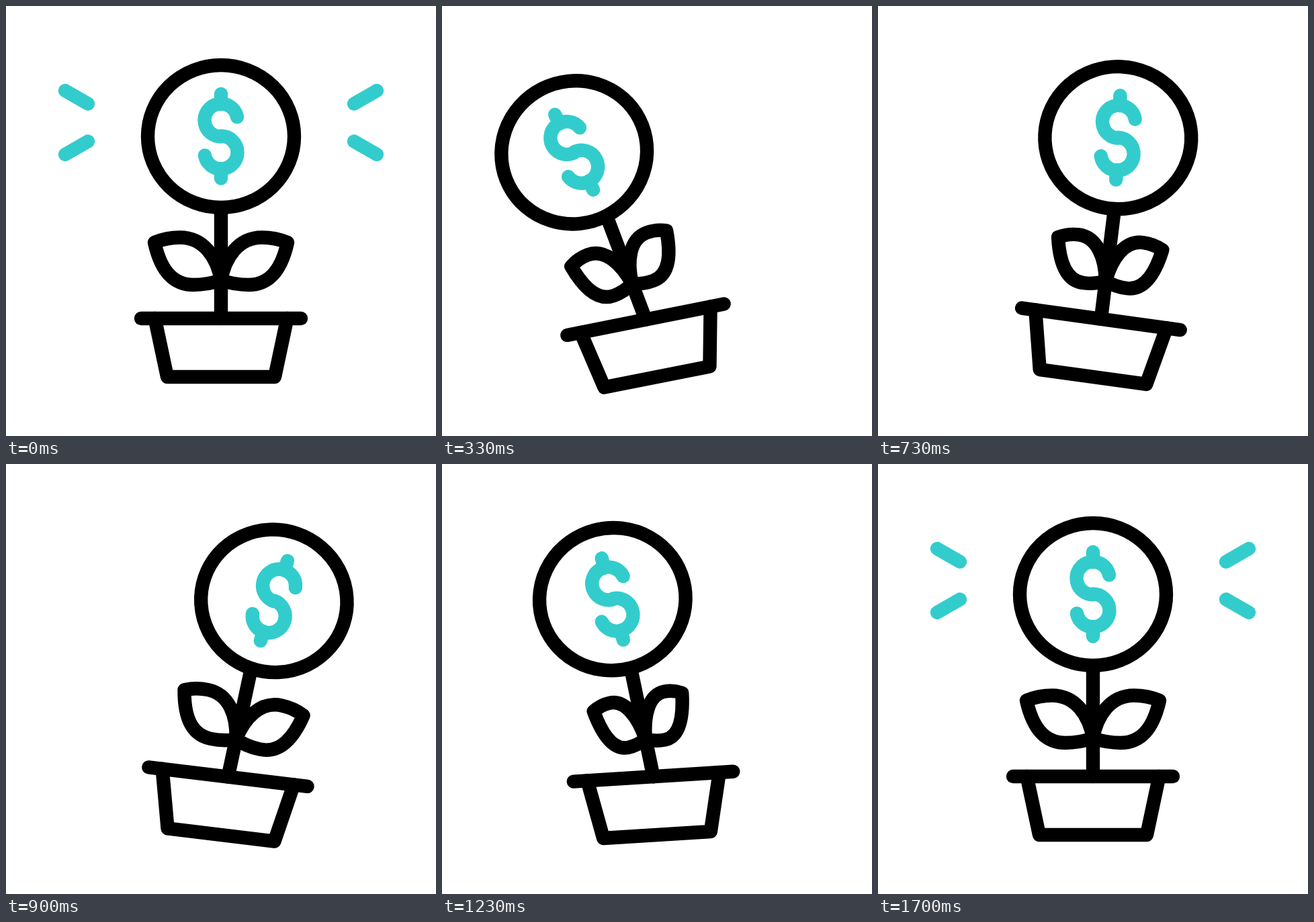
Animation, 640 px wide and 640 px high, one loop 2000 ms. Source, as an HTML page with a canvas:

```html
<!DOCTYPE html>
<html>
<head>
<meta charset="utf-8">
<title>Money plant</title>
<style>
  html, body { margin: 0; width: 100%; height: 100%; overflow: hidden; background: #fff; }
  canvas { display: block; width: 100vmin; height: 100vmin; }
</style>
</head>
<body>
<canvas id="stage" width="640" height="640"></canvas>
<script>
const ctx = document.getElementById('stage').getContext('2d');
const LOOP = 2000, BLACK = '#000', TEAL = '#33cccc';
const BEATS = [440, 800, 1133, 1470];

// Smooth step from 0 at time a to 1 at time b.
function ease(t, a, b) {
  const u = Math.min(1, Math.max(0, (t - a) / (b - a)));
  return u * u * (3 - 2 * u);
}

const bump = (t, a, peak, b) => ease(t, a, peak) - ease(t, peak, b);

// Swings through the given angles on the shared beats, delayed by lag, back to rest.
function swing(t, from, lag, ...angles) {
  let angle = 0, last = 0;
  BEATS.forEach((beat, i) => {
    const next = angles[i] || 0, to = beat + lag;
    angle += (next - last) * ease(t, from, to);
    [from, last] = [to, next];
  });
  return angle;
}

function rotateAt(y, degrees) {
  ctx.translate(320, y);
  ctx.rotate(degrees * Math.PI / 180);
  ctx.translate(-320, -y);
}

function line(color, ...points) {
  ctx.strokeStyle = color;
  ctx.beginPath();
  points.forEach(([x, y]) => ctx.lineTo(x, y));
  ctx.stroke();
}

// Only the outline is scaled, so the stroke keeps its weight.
function leaf(scale) {
  const x = dx => 320 + dx * scale;
  const curve = (a, b, c, d, e, f) => ctx.bezierCurveTo(x(a), b, x(c), d, x(e), f);
  ctx.beginPath();
  ctx.moveTo(320, 408);
  curve(6, 374, 26, 344.5, 61, 344.5);
  curve(74, 344.5, 87, 347, 99, 352);
  curve(91, 388, 75, 415, 41, 415);
  curve(28, 415, 14, 413, 0, 408);
  ctx.closePath();
  ctx.stroke();
}

function coin() {
  ctx.strokeStyle = BLACK;
  ctx.beginPath();
  ctx.ellipse(320, 194, 109, 106, 0, 0, 2 * Math.PI);
  ctx.stroke();
  line(TEAL, [320, 131], [320, 146]);
  line(TEAL, [320, 242], [320, 256.5]);
  ctx.beginPath();
  ctx.arc(320, 170, 24.5, -0.2, Math.PI / 2, true);
  ctx.arc(320, 218, 24.5, -Math.PI / 2, Math.PI - 0.18);
  ctx.stroke();
}

function rays(grow) {
  if (grow <= 0) return;
  for (const side of [-1, 1]) {
    for (const up of [-1, 1]) {
      const x = 198, y = 173.5 + up * 28;
      line(TEAL, [320 + side * x, y], [320 + side * (x + 34 * grow), y + up * 19.5 * grow]);
    }
  }
}

function draw(t) {
  ctx.fillStyle = '#fff';
  ctx.fillRect(0, 0, 640, 640);
  ctx.lineWidth = 20.4;
  ctx.lineCap = ctx.lineJoin = 'round';
  rays(1 - ease(t, 0, 260) + ease(t, 1450, 1700));

  ctx.save();
  rotateAt(552, swing(t, 0, 0, -13.3, 10.1, -4.5));
  line(BLACK, [201, 465], [439, 465]);
  line(BLACK, [221.5, 465], [240, 552], [400, 552], [418.5, 465]);

  rotateAt(465, swing(t, 67, 67, -14.5, 5.6, -8.4));
  line(BLACK, [320, 300], [320, 465]);
  const spread = 1 - 0.8 * bump(t, 200, 565, 815) - 0.39 * bump(t, 815, 1100, 1590);
  leaf(spread);
  leaf(-spread);

  rotateAt(300, swing(t, 0, 145, -10.6, 7.3, -3.6));
  coin();
  ctx.restore();
}

const start = performance.now();
function tick() {
  draw((performance.now() - start) % LOOP);
  requestAnimationFrame(tick);
}
tick();
</script>
</body>
</html>
```
